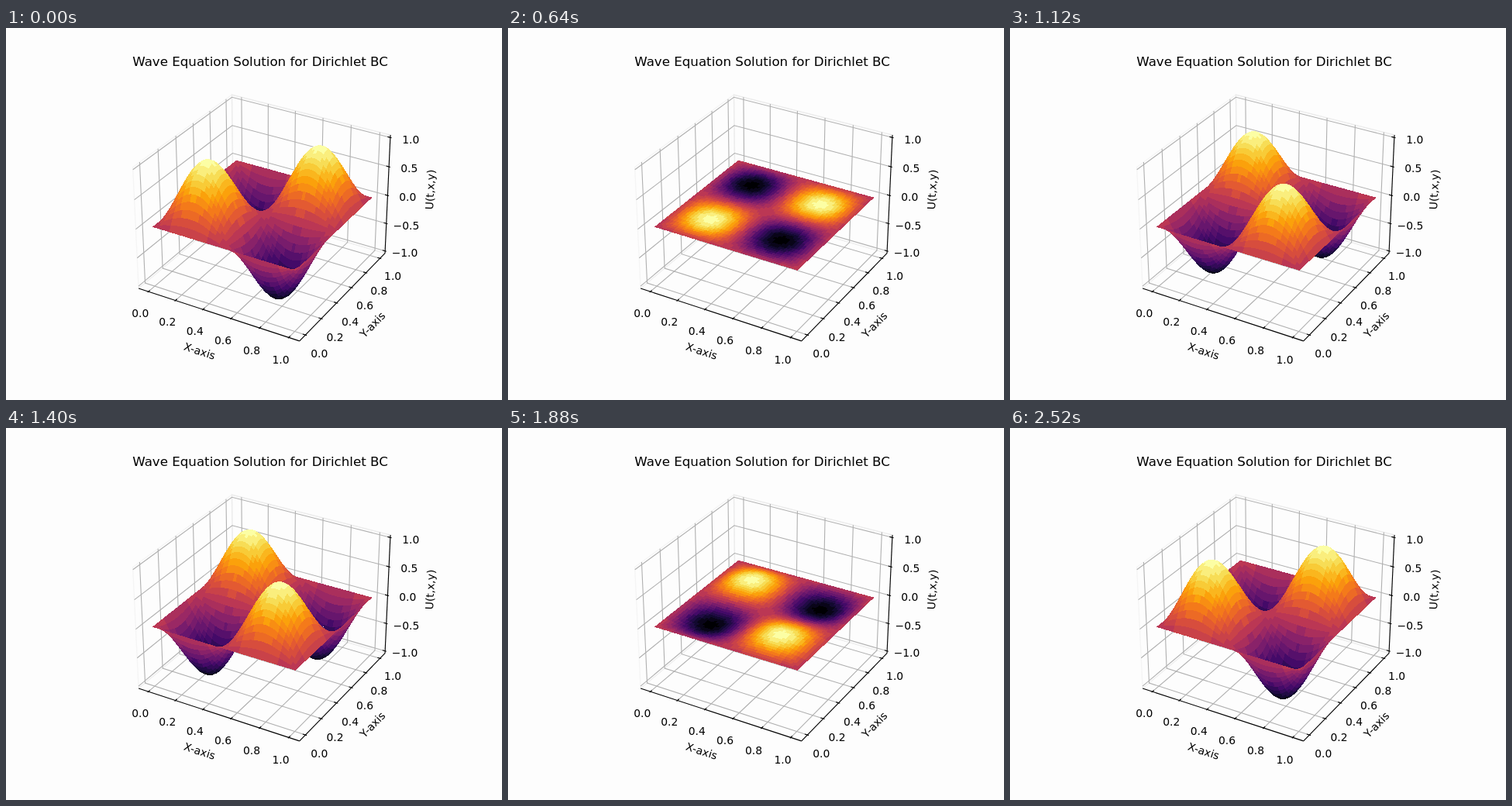
Animation of 640x480 px, one loop 2.56 s. Source, as an HTML page:

```html
<!DOCTYPE html>
<html lang="en">
<head>
<meta charset="utf-8">
<title>Wave Equation Solution</title>
<style>
  html, body { margin: 0; width: 100%; height: 100%; overflow: hidden; background: #fdfdfd; }
  svg { display: block; width: 640px; height: 480px; }
  text { font: 13.89px "DejaVu Sans", sans-serif; text-anchor: middle; fill: #000; }
  .title { font-size: 16.67px; }
  path { fill: none; }
  .grid { stroke: #b0b0b0; stroke-width: 1.11; }
  .axis { stroke: #000; stroke-width: 1.11; }
  .pane { stroke-width: 1.39; }
</style>
</head>
<body>
<svg id="stage" viewBox="0 0 640 480">
  <g id="frame"></g>
  <g id="surface" shape-rendering="crispEdges"></g>
  <text class="title" x="328" y="49.3">Wave Equation Solution for Dirichlet BC</text>
</svg>
<script>
const NS = "http://www.w3.org/2000/svg";
const frame = document.getElementById("frame");
const surface = document.getElementById("surface");

const STEPS = 64, STEP_MS = 40, CELLS = 49, LEVELS = 24;
const SX = 8 / 7 / 1.1, SZ = 3 / 7;          // data units to world units
const BX = 4 / 7 * 25 / 24, BZ = SZ * 25 / 24; // half sizes of the box
const DX = 2 / 21, DZ = 1 / 14;              // offset units beside the box

// Perspective camera at elevation 30, azimuth -60
const C = Math.sqrt(3) / 2;
function project(x, y, z) {
  const depth = 10 - (C / 2 * x - 0.75 * y + 0.5 * z);
  const k = 1997.8 / depth;
  return [333 + k * (C * x + 0.5 * y), 237.4 - k * (-0.25 * x + C / 2 * y + C * z), depth];
}

const fix = p => p[0].toFixed(2) + " " + p[1].toFixed(2);

function add(parent, tag, attrs, text) {
  const el = document.createElementNS(NS, tag);
  for (const key in attrs) el.setAttribute(key, attrs[key]);
  if (text) el.textContent = text;
  parent.appendChild(el);
  return el;
}

function line(cls, points, extra) {
  const d = "M" + points.map(p => fix(project(...p))).join("L");
  return add(frame, "path", { class: cls, d, ...extra });
}

function tickLabel(point, value) {
  const [x, y] = project(...point);
  add(frame, "text", { x: x.toFixed(2), y: (y + 10.8).toFixed(2) },
    value.toFixed(1).replace("-", "\u2212"));
}

function axisLabel(point, from, to, text) {
  const [x, y] = project(...point), a = project(...from), b = project(...to);
  const angle = Math.atan2(b[1] - a[1], b[0] - a[0]) * 180 / Math.PI;
  add(frame, "text", { y: 3.7, transform: `translate(${fix([x, y])}) rotate(${angle.toFixed(2)})` }, text);
}

function drawFrame() {
  const near = [-BX, -BX, -BZ], right = [BX, -BX, -BZ];
  const far = [BX, BX, -BZ], top = [BX, BX, BZ];
  const back = [-BX, BX, -BZ], backTop = [-BX, BX, BZ];
  line("pane", [near, back, backTop, [-BX, -BX, BZ], near], { stroke: "#f5f5f5" });
  line("pane", [back, far, top, backTop, back], { stroke: "#ececec" });
  line("pane", [near, right, far, back, near], { stroke: "#f1f1f1" });

  const ticks = [0, 0.2, 0.4, 0.6, 0.8, 1].map(v => [v, (v - 0.5) * SX]);
  const zTicks = [-1, -0.5, 0, 0.5, 1].map(v => [v, v * SZ]);
  for (const [, p] of ticks) {
    line("grid", [[p, -BX, -BZ], [p, BX, -BZ], [p, BX, BZ]]);
    line("grid", [[BX, p, -BZ], [-BX, p, -BZ], [-BX, p, BZ]]);
  }
  for (const [, p] of zTicks) line("grid", [[-BX, -BX, p], [-BX, BX, p], [BX, BX, p]]);

  line("axis", [near, right]);
  line("axis", [right, far]);
  line("axis", [far, top]);

  const out = BX + 0.1 * DX, inn = BX - 0.2 * DX;
  const lx = BX + 1.037 * DX, lz = BZ + 1.037 * DZ;
  for (const [v, p] of ticks) {
    line("axis", [[p, -out, -BZ], [p, -inn, -BZ]]);
    line("axis", [[out, p, -BZ], [inn, p, -BZ]]);
    tickLabel([p, -lx, -lz], v);
    tickLabel([lx, p, -lz], v);
  }
  for (const [v, p] of zTicks) {
    line("axis", [[out, BX, p], [inn, BX, p]]);
    tickLabel([lx, lx, p], v);
  }

  const tx = BX + 2.255 * DX, tz = BZ + 2.255 * DZ;
  axisLabel([0, -tx, -tz], near, right, "X-axis");
  axisLabel([tx, 0, -tz], right, far, "Y-axis");
  axisLabel([tx, tx, 0], far, top, "U(t,x,y)");
}

// Inferno colour map
const stops = ["000003", "160b39", "410967", "6a176e", "932567", "bb3754",
  "dd5139", "f3761b", "fca50a", "f6d746", "fcfea4"]
  .map(h => [0, 2, 4].map(i => parseInt(h.slice(i, i + 2), 16)));
function inferno(v) {
  const s = v * 10, i = Math.min(9, Math.floor(s));
  return `rgb(${stops[i].map((c, k) => Math.round(c + (stops[i + 1][k] - c) * (s - i)))})`;
}
const palette = Array.from({ length: LEVELS + 1 }, (_, i) => inferno(i / LEVELS));

const N = CELLS + 1;
const wave = Array.from({ length: N }, (_, i) => Math.sin(2 * Math.PI * i / CELLS));
const cells = [];
for (let j = 0; j < CELLS; j++)
  for (let i = 0; i < CELLS; i++)
    cells.push({
      corners: [j * N + i, j * N + i + 1, (j + 1) * N + i + 1, (j + 1) * N + i],
      mean: (wave[i] + wave[i + 1]) * (wave[j] + wave[j + 1]) / 4
    });
const peak = Math.max(...cells.map(c => c.mean));
const quads = cells.map(() => add(surface, "path", {}));

function drawSurface(step) {
  const amp = Math.cos(2 * Math.PI * step / STEPS);
  const sign = amp < 0 ? -1 : 1;
  const pts = [];
  for (let j = 0; j < N; j++)
    for (let i = 0; i < N; i++)
      pts.push(project((i / CELLS - 0.5) * SX, (j / CELLS - 0.5) * SX, amp * wave[i] * wave[j] * SZ));
  const text = pts.map(fix);
  for (const c of cells) c.depth = c.corners.reduce((sum, k) => sum + pts[k][2], 0);
  // Farthest cells are painted first
  const order = cells.slice().sort((a, b) => b.depth - a.depth);
  order.forEach((c, n) => {
    const level = Math.round((0.5 + 0.5 * sign * c.mean / peak) * LEVELS);
    quads[n].setAttribute("d", "M" + c.corners.map(k => text[k]).join("L") + "Z");
    quads[n].style.fill = palette[level];
  });
}

drawFrame();
drawSurface(0);
let shown = 0;
const start = performance.now();
function tick() {
  const step = Math.floor((performance.now() - start) / STEP_MS) % STEPS;
  if (step !== shown) drawSurface(shown = step);
  requestAnimationFrame(tick);
}
requestAnimationFrame(tick);
</script>
</body>
</html>
```
